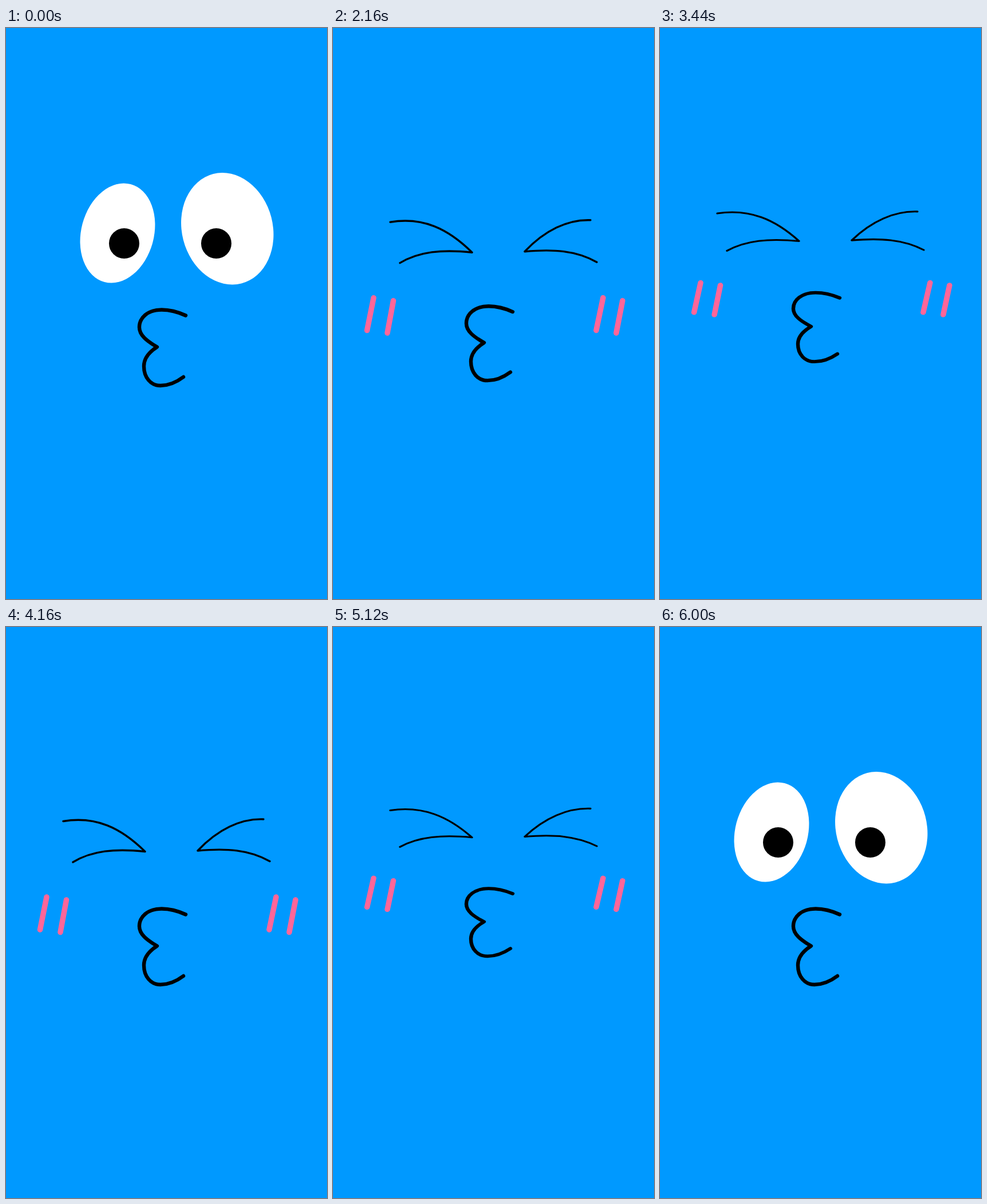
An HTML page that plays this animation: 561 px wide and 998 px high, repeating every 6080 ms.

```html
<!DOCTYPE html>
<html lang="en">
<head>
<meta charset="utf-8">
<title>Kissing face</title>
<style>
  html, body { margin: 0; height: 100%; overflow: hidden; background: #09f; }
  svg { display: block; width: 100%; height: 100%; }
  .line { fill: none; stroke: #000; stroke-linecap: round; stroke-linejoin: round; }
  #lids { stroke-width: 3.4; }
  #blush { stroke: #f69; stroke-width: 9.5; }
  #mouth { stroke-width: 6.4; }
</style>
</head>
<body>
<svg viewBox="0 0 561 998">
  <g id="leftEye">
    <ellipse cx="195" cy="358.5" rx="63.5" ry="88.5" fill="#fff" transform="rotate(15 195 358.5)"/>
    <circle cx="206.5" cy="376.5" r="26.5"/>
  </g>
  <g id="rightEye">
    <ellipse cx="386.8" cy="350.8" rx="79.4" ry="98.8" fill="#fff" transform="rotate(-14.4 386.8 350.8)"/>
    <circle cx="367.5" cy="376.5" r="26.5"/>
  </g>
  <g id="squint">
    <path id="lids" class="line" d="M100 339.5C157 330 201 351 243 392.5C190 387 150 391 117 411
      M450 336C410 334.5 370 354 335 391C385 386.5 425 389 461 409.5"/>
    <path id="blush" class="line" d="M71 472L59.5 529M105.5 477L95 533.5M472 472L460 529M506 477L495 533.5"/>
  </g>
  <path id="mouth" class="line" d="M314 502.5C301 496.5 286 492.5 272 492.5C247 492.5 233 507 233 523
    C233 537 246 547 264 557.5C249 567 241 578 241 591C241 611 253 625 270 625C285 625 298 619 310 610"/>
</svg>
<script>
  const LOOP = 6080, STEP = 80, PIVOT_Y = 162, SQUEEZED = 0.893;
  const part = id => document.getElementById(id);

  // Linear interpolation through [time, value] keys.
  function track(keys, t) {
    const i = keys.findIndex(([time]) => time > t);
    if (i === 0) return keys[0][1];
    if (i < 0) return keys[keys.length - 1][1];
    const [t0, v0] = keys[i - 1], [t1, v1] = keys[i];
    return v0 + (v1 - v0) * (t - t0) / (t1 - t0);
  }

  const squeezeFrom = start => [
    [start, 1], [3740, SQUEEZED], [4140, 1], [4340, 1],
    [4940, SQUEEZED], [5160, SQUEEZED], [5500, 1]
  ];
  const mouthKeys = squeezeFrom(1820);
  const squintKeys = squeezeFrom(2140);
  const openKeys = [[1800, 1], [2140, 0], [5540, 0], [5880, 1]];

  function scale(id, sx, sy, cx, cy) {
    part(id).setAttribute('transform',
      `translate(${cx} ${cy}) scale(${sx} ${sy}) translate(${-cx} ${-cy})`);
  }

  function draw(now) {
    const t = Math.floor(now % LOOP / STEP) * STEP;
    const open = track(openKeys, t);
    const widen = 1 + 0.14 * (1 - open);
    scale('leftEye', widen, open, 195, 360);
    scale('rightEye', widen, open, 387, 360);
    scale('squint', 1, track(squintKeys, t), 0, PIVOT_Y);
    scale('mouth', 1, track(mouthKeys, t), 0, PIVOT_Y);
    part('squint').style.display = t >= 2140 && t < 5540 ? '' : 'none';
  }

  const start = performance.now();
  function tick() {
    draw(performance.now() - start);
    requestAnimationFrame(tick);
  }
  tick();
</script>
</body>
</html>
```
